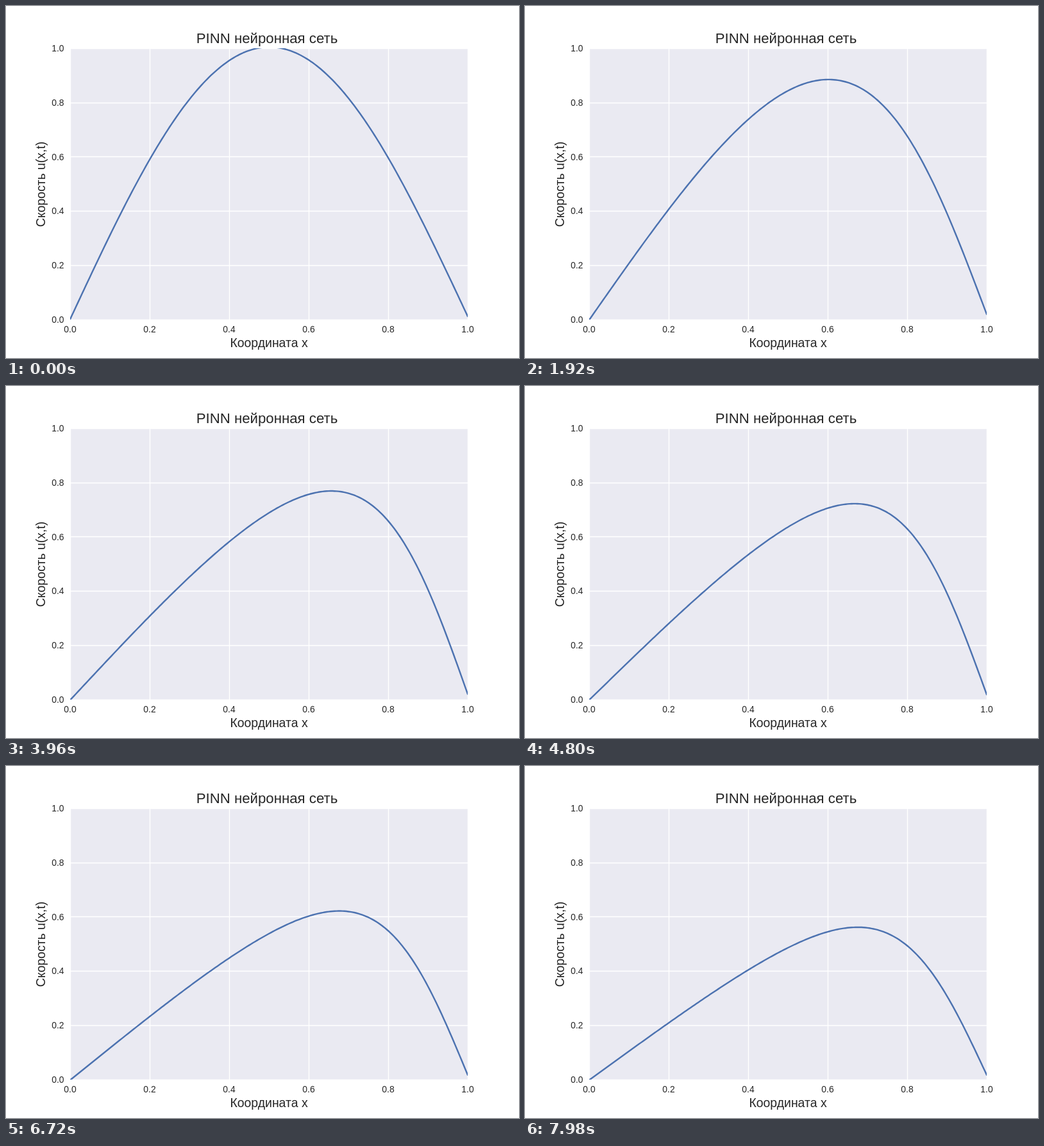
Animation, 800 px wide and 550 px high, one loop 8000 ms. Source, as an HTML page:

```html
<!DOCTYPE html>
<html lang="ru">
<head>
<meta charset="utf-8">
<title>Скорость u(x,t)</title>
<style>
  html, body { margin: 0; width: 100%; height: 100%; overflow: hidden; background: #fff; }
  svg { display: block; width: 800px; height: 550px; }
  text { font-family: "Liberation Sans", Arial, sans-serif; fill: #262626; }
  .tick { font-size: 13.89px; }
  .label { font-size: 19.44px; text-anchor: middle; }
  .title { font-size: 22.22px; text-anchor: middle; }
</style>
</head>
<body>
<svg viewBox="0 0 800 550">
  <clipPath id="plot"><rect x="100" y="66" width="620" height="424"/></clipPath>
  <rect x="100" y="66" width="620" height="424" fill="#eaeaf2"/>
  <g clip-path="url(#plot)" fill="none">
    <path id="grid" stroke="#fff" stroke-width="1.39"/>
    <path id="curve" stroke="#4c72b0" stroke-width="2.43" stroke-linejoin="round" stroke-linecap="round"/>
  </g>
  <g id="ticks"></g>
  <text class="title" x="407" y="57.8">PINN нейронная сеть</text>
  <text class="label" x="410" y="533">Координата x</text>
  <text class="label" transform="translate(60.5 278.5) rotate(-90)">Скорость u(x,t)</text>
</svg>
<script>
const LOOP = 8000, STEP = 30, MS_PER_UNIT = 15000;
const NU = 0.1, MODES = 8, SAMPLES = 200;
const $ = id => document.getElementById(id);
const px = x => 100 + 620 * x;
const py = u => 489.5 - 423.5 * u;

// Modified Bessel function I_n(z) by its power series
function bessel(n, z) {
  let term = 1, sum = 0;
  for (let k = 1; k <= n; k++) term *= z / 2 / k;
  for (let k = 0; k < 20; k++) {
    sum += term;
    term *= z * z / 4 / ((k + 1) * (k + 1 + n));
  }
  return sum;
}

const coef = Array.from({ length: MODES + 1 }, (_, n) =>
  (n ? 2 : 1) * bessel(n, 1 / (2 * Math.PI * NU)));

// Cole-Hopf solution of the Burgers equation for u(x,0) = sin(pi x)
function burgers(x, modes) {
  let num = 0, den = 0;
  modes.forEach((c, n) => {
    num += n * c * Math.sin(n * Math.PI * x);
    den += c * Math.cos(n * Math.PI * x);
  });
  return 2 * Math.PI * NU * num / den;
}

// Small deviation of the network from the exact solution
function deviation(ms) {
  const settle = Math.exp(-ms / 900);
  const end = 0.016 - 0.0054 * settle + 0.0045 * Math.exp(-(((ms - 3000) / 1800) ** 2));
  const power = 3 - 1.7 * settle;
  return x => end * x ** power - 0.003 * (1 - settle) * (1 - x) ** 2;
}

function draw(ms) {
  const t = ms / MS_PER_UNIT;
  const modes = coef.map((c, n) => c * Math.exp(-n * n * Math.PI ** 2 * NU * t));
  const dev = deviation(ms);
  const points = [];
  for (let i = 0; i <= SAMPLES; i++) {
    const x = i / SAMPLES;
    points.push(px(x).toFixed(2) + ',' + py(burgers(x, modes) + dev(x)).toFixed(2));
  }
  $('curve').setAttribute('d', 'M' + points.join('L'));
}

function tick(str, x, y, anchor) {
  const el = document.createElementNS('http://www.w3.org/2000/svg', 'text');
  el.setAttribute('class', 'tick');
  el.setAttribute('x', x);
  el.setAttribute('y', y);
  el.setAttribute('text-anchor', anchor);
  el.textContent = str;
  $('ticks').append(el);
}

function buildAxes() {
  let d = '';
  for (let i = 0; i <= 5; i++) {
    const v = i / 5, x = px(v), y = py(v);
    d += `M${Math.round(x) + 0.5},66V490M100,${Math.round(y) + 0.5}H720`;
    tick(v.toFixed(1), x, 510, 'middle');
    tick(v.toFixed(1), 90.5, y + 5.3, 'end');
  }
  $('grid').setAttribute('d', d);
}

const start = performance.now();
function frame() {
  const ms = (performance.now() - start) % LOOP;
  draw(Math.floor(ms / STEP) * STEP);
  requestAnimationFrame(frame);
}

buildAxes();
draw(0);
requestAnimationFrame(frame);
</script>
</body>
</html>
```
